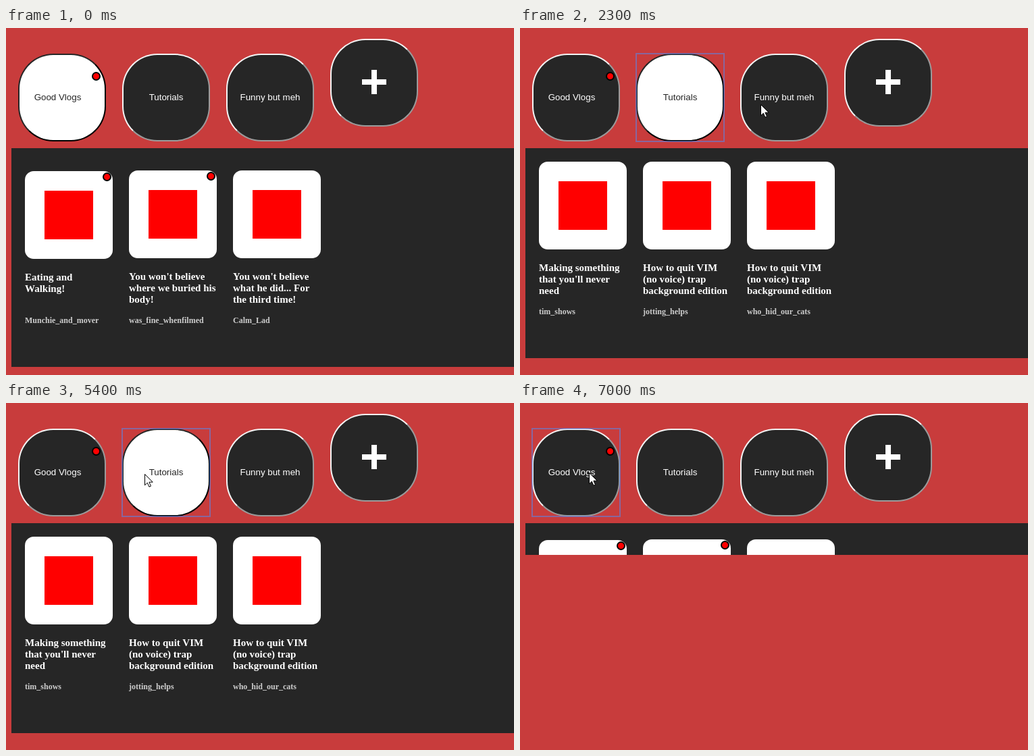
Recreate the animation shown at these times as an HTML page. Size 752 by 514 pixels, loop 7100 ms.

```html
<!DOCTYPE html>
<html lang="en">
<head>
<meta charset="utf-8">
<title>Video groups</title>
<style>
  * { box-sizing: border-box; }
  html, body { margin: 0; width: 100%; height: 100%; overflow: hidden; background: #c83c3c; }
  #stage { position: relative; width: 752px; height: 514px; overflow: hidden; }
  #stage div, svg { position: absolute; }

  #stage .tab {
    --lit: #f4f4f4; --shade: #9b9b9b;
    top: 38px; width: 130px; height: 130px; border-radius: 40%; padding-bottom: 2px;
    display: flex; align-items: center; justify-content: center;
    border: 2px solid; border-color: var(--lit) var(--shade) var(--shade) var(--lit);
    background: #262626; color: #fff;
    font: 13.333px/15px "Liberation Sans", Arial, sans-serif;
  }
  #stage .tab.selected { --lit: #262626; --shade: #000; background: #fff; color: #262626; }
  #stage .tab.pressed { border-color: var(--shade) var(--lit) var(--lit) var(--shade); }
  .tab.focused::after {
    content: ""; position: absolute; inset: -3px;
    border: 2px solid rgba(77, 144, 254, .5);
  }
  .bar { background: #fff; }

  .dot { width: 13px; height: 13px; border: 2px solid #000; border-radius: 50%; background: #f00; }
  .tab .dot { left: 107px; top: 25px; }
  .card .dot { left: 115px; top: 2px; }

  .panel { left: 8px; top: 178px; width: 744px; overflow: hidden; background: #262626; }
  .card { width: 130px; height: 130px; border-radius: 10%; background: #fff; }
  .logo { left: 29px; top: 29px; width: 72px; height: 72px; background: #f00; }
  .title, .author { white-space: nowrap; font-family: "Liberation Serif", "Times New Roman", serif; font-weight: bold; }
  .title { top: 149px; color: #fff; font-size: 15px; line-height: 17px; }
  .author { color: #ccc; font-size: 12px; line-height: 14px; }
</style>
</head>
<body>
<div id="stage">
  <svg id="cursor" width="16" height="22" viewBox="-1 -1 16 22">
    <path d="M.5.5V16.8L4.3 13.2 6.9 19.2 9.5 18.1 6.9 12.2H12.2Z" fill="#fff" stroke="#000"/>
  </svg>
</div>
<script>
const LOOP = 7100, SLIDE = 400, PADDING = 10;

const groups = [
  { name: "Good Vlogs", isNew: true, height: 324, cardTop: 33, videos: [
    { title: ["Eating and", "Walking!"], author: "Munchie_and_mover", isNew: true, drop: 1 },
    { title: ["You won't believe", "where we buried his", "body!"], author: "was_fine_whenfilmed", isNew: true },
    { title: ["You won't believe", "what he did... For", "the third time!"], author: "Calm_Lad" } ] },
  { name: "Tutorials", height: 311, cardTop: 20, videos: [
    { title: ["Making something", "that you'll never", "need"], author: "tim_shows" },
    { title: ["How to quit VIM", "(no voice) trap", "background edition"], author: "jotting_helps" },
    { title: ["How to quit VIM", "(no voice) trap", "background edition"], author: "who_hid_our_cats" } ] },
  { name: "Funny but meh", height: 244, cardTop: 20, videos:
    [1, 2, 3].map(n => ({ title: ["Funny Title " + n], author: "" })) },
];

// tab index, mouse down, mouse up
const clicks = [[1, 1680, 1780], [2, 2980, 3080], [1, 4480, 4580], [0, 6080, 6180], [0, 6480, 6700]];

// time, x, y of the pointer
const pointerPath = [
  [800, 420, 330], [1080, 257, 120], [2100, 257, 120], [2400, 405, 108], [3850, 405, 108],
  [4100, 257, 105], [5300, 257, 105], [5600, 102, 102], [LOOP, 102, 102],
];

const stage = document.getElementById("stage");
const cursor = document.getElementById("cursor");

function box(parent, className, style = {}, text = "") {
  const el = document.createElement("div");
  el.className = className;
  el.innerText = text;
  Object.assign(el.style, style);
  parent.append(el);
  return el;
}

const tabs = groups.map((group, i) => {
  const tab = box(stage, "tab", { left: 18 + 154 * i + "px" });
  const label = document.createElement("span");
  label.textContent = group.name;
  tab.append(label);
  if (group.isNew) {
    label.style.marginRight = "13px";
    box(tab, "dot");
  }
  return tab;
});

const addTab = box(stage, "tab", { left: "480px", top: "16px" });
box(addTab, "bar", { left: "45px", top: "58px", width: "36px", height: "8px" });
box(addTab, "bar", { left: "59px", top: "44px", width: "8px", height: "36px" });

const panels = groups.map(group => {
  const panel = box(stage, "panel");
  const content = box(panel, "content");
  group.videos.forEach((video, i) => {
    const drop = video.drop || 0;
    const card = box(content, "card", { left: 20 + 154 * i + "px", top: group.cardTop + drop + "px" });
    box(card, "logo");
    if (video.isNew) box(card, "dot");
    box(card, "title", {}, video.title.join("\n"));
    box(card, "author", { top: 215 - drop + "px" }, video.author);
  });
  return { panel, content };
});
stage.append(cursor);

const swing = p => 0.5 - Math.cos(Math.PI * Math.min(1, p)) / 2;

function pointerAt(t) {
  const next = pointerPath.findIndex(point => point[0] > t);
  const [t0, x0, y0] = pointerPath[next - 1], [t1, x1, y1] = pointerPath[next];
  const p = (t - t0) / (t1 - t0);
  return [x0 + (x1 - x0) * p, y0 + (y1 - y0) * p];
}

function render(t) {
  let selected = 0, shown = 0, amount = 1, focused = -1, pressed = -1;
  for (const [tab, down, up] of clicks) {
    if (t < down) break;
    focused = tab;
    if (t < up) { pressed = tab; break; }
    // The selected tab slides its panel shut; any other tab swaps panels at once.
    if (tab === selected) {
      selected = -1;
      amount = 1 - swing((t - up) / SLIDE);
    } else {
      selected = shown = tab;
    }
  }

  tabs.forEach((tab, i) => {
    tab.classList.toggle("selected", i === selected);
    tab.classList.toggle("focused", i === focused);
    tab.classList.toggle("pressed", i === pressed);
  });
  panels.forEach(({ panel, content }, i) => {
    panel.style.display = i === shown ? "block" : "none";
    panel.style.height = groups[i].height * amount + "px";
    content.style.top = PADDING * (amount - 1) + "px";
  });

  const visible = t >= pointerPath[0][0];
  cursor.style.display = visible ? "block" : "none";
  if (visible) {
    const [x, y] = pointerAt(t);
    cursor.style.left = Math.round(x) - 1 + "px";
    cursor.style.top = Math.round(y) + "px";
  }
}

const start = performance.now();
function tick() {
  render((performance.now() - start) % LOOP);
  requestAnimationFrame(tick);
}
tick();
</script>
</body>
</html>
```
